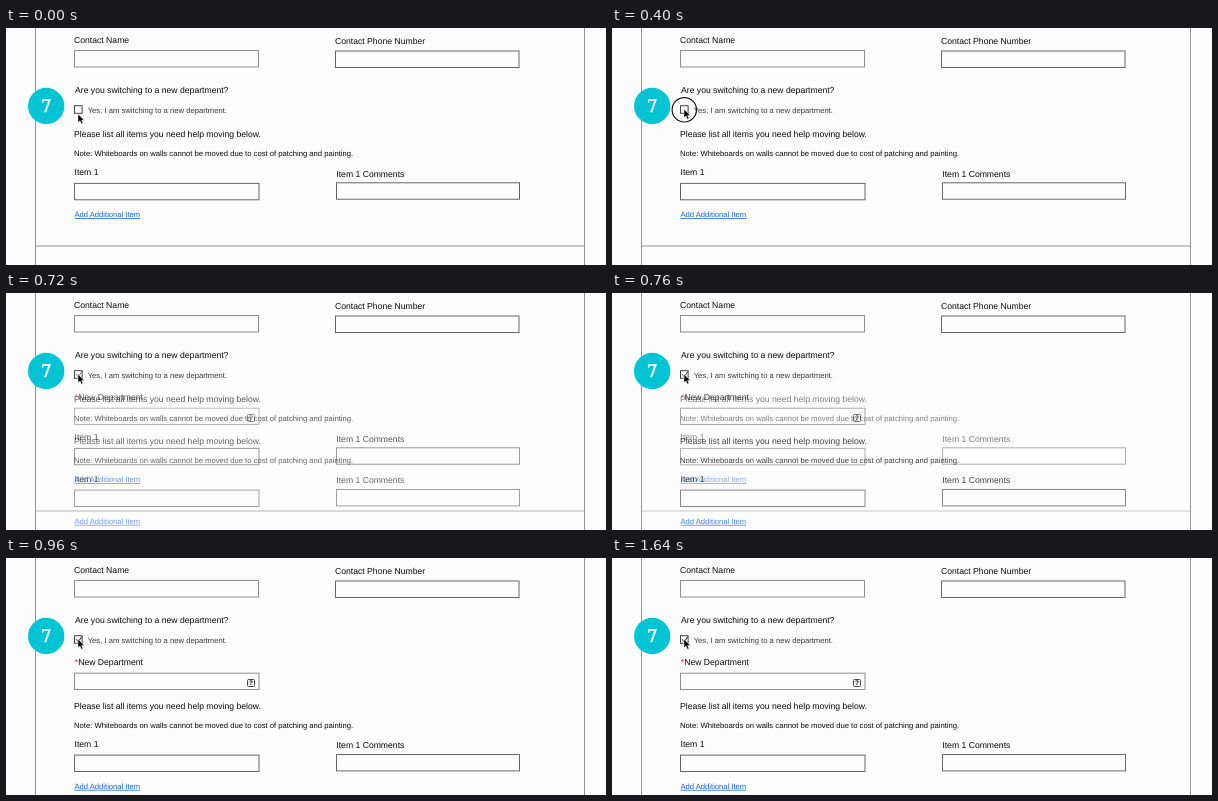
An HTML page that plays this animation: 600x237 px, repeating every 2.2 s.

```html
<!DOCTYPE html>
<html lang="en">
<head>
<meta charset="utf-8">
<title>Moving request form</title>
<style>
html, body { margin: 0; width: 100%; height: 100%; overflow: hidden; background: #fdfdfd; }
svg { display: block; width: 600px; height: 237px; }
text { font: 8.63px "Liberation Sans", Arial, sans-serif; fill: #080808; text-rendering: geometricPrecision; }
.small { font-size: 7.67px; }
.soft { fill: #383838; }
.link { font-size: 7.63px; fill: #1462dc; text-decoration: underline; }
.badge { font: 400 18px "Noto Serif", serif; fill: #fff; stroke: #fff; stroke-width: .5; text-anchor: middle; }
.help { font-size: 6.6px; font-weight: bold; text-anchor: middle; }
.box { fill: none; stroke: #666; stroke-width: 1; }
.dark { stroke: #444; }
.pale { stroke: #8e8e8e; }
.rule { stroke: #939393; stroke-width: 1; }
</style>
</head>
<body>
<svg viewBox="0 0 600 237">
  <path class="rule" d="M29.5 0V237M578.5 0V237"/>

  <text x="68" y="15">Contact Name</text>
  <rect class="box pale" x="68.5" y="22.5" width="184" height="16.5"/>
  <text x="329" y="15.5">Contact Phone Number</text>
  <rect class="box" x="329.5" y="23" width="183.5" height="16.5"/>

  <text x="69" y="65.4">Are you switching to a new department?</text>
  <rect class="box dark" x="68.5" y="77.7" width="7.6" height="7.6"/>
  <text class="small soft" x="81.7" y="84.6">Yes, I am switching to a new department.</text>

  <g id="before">
    <path class="rule" d="M29.5 218H578.5"/>
  </g>
  <g id="after">
    <path d="M70 81.2L72.2 83.8L76 78.4" fill="none" stroke="#222"/>
    <text x="68.8" y="107.1"><tspan fill="#d9252b">*</tspan>New Department</text>
    <rect class="box pale" x="68.5" y="115.2" width="184.5" height="16.3"/>
    <rect class="box dark" x="241.5" y="121.5" width="7" height="7" rx="1"/>
    <text class="help" x="245" y="127.4">?</text>
  </g>

  <circle cx="40.2" cy="78" r="18.2" fill="#00c4d4"/>
  <text class="badge" x="40.4" y="84.2">7</text>

  <circle id="ring" cx="72.3" cy="81.8" r="12.2" fill="none" stroke="#151515" stroke-width="1.2"/>
  <path id="cursor" d="M0 0V8.6L2 6.8L3.4 10L5 9.3L3.6 6.2H6.3Z" fill="#000" stroke="#fff" stroke-width=".5"/>
</svg>
<script>
const NS = "http://www.w3.org/2000/svg";
const LOOP = 2200, STEP = 40;
const $ = id => document.getElementById(id);
const ramp = (t, from, to) => Math.min(1, Math.max(0, (t - from) / (to - from)));
const smooth = p => p * p * (3 - 2 * p);

function add(parent, tag, attrs, label) {
  const el = document.createElementNS(NS, tag);
  for (const key in attrs) el.setAttribute(key, attrs[key]);
  if (label) el.textContent = label;
  parent.append(el);
}

// The item section appears twice, the second time pushed down by the new field.
function addItems(group, dy) {
  const text = (x, y, label, cls = "") => add(group, "text", { x, y: y + dy, class: cls }, label);
  const box = (x, y, width) => add(group, "rect", { x, y: y + dy, width, height: 16.4, class: "box" });
  text(68, 109, "Please list all items you need help moving below.");
  text(68, 127.8, "Note: Whiteboards on walls cannot be moved due to cost of patching and painting.", "small");
  text(68.5, 147.4, "Item 1");
  box(68.5, 155.4, 184.5);
  text(330.3, 148.5, "Item 1 Comments");
  box(330.5, 154.8, 183);
  text(68.5, 189.1, "Add Additional Item", "link");
}

const before = $("before"), after = $("after"), ring = $("ring"), cursor = $("cursor");
addItems(before, 0);
addItems(after, 41.7);

function draw(now) {
  const t = Math.floor((now % LOOP) / STEP) * STEP;
  const y = 86 - 4.8 * smooth(ramp(t, 40, 240));
  cursor.setAttribute("transform", `translate(72 ${y})`);
  ring.style.display = t >= 400 && t < 480 ? "" : "none";
  before.style.opacity = 1 - ramp(t, 635, 890);
  after.style.opacity = ramp(t, 573, 815);
}

const start = performance.now();
function tick() {
  draw(performance.now() - start);
  requestAnimationFrame(tick);
}
tick();
</script>
</body>
</html>
```
